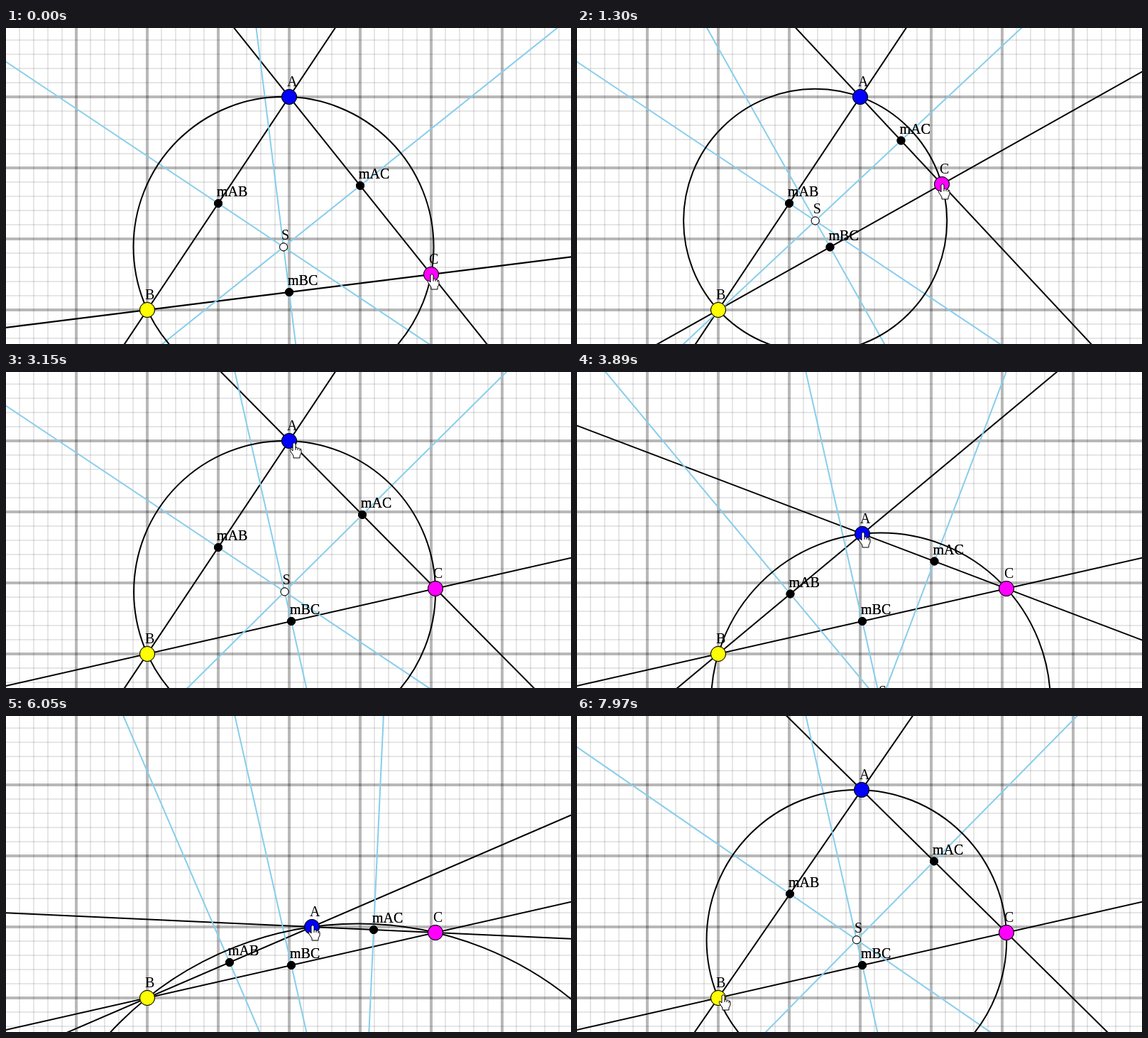
An HTML page with a canvas for the animation above (8000 ms loop, 796 by 445 pixels).

```html
<!DOCTYPE html>
<html lang="en">
<head>
<meta charset="utf-8">
<title>Circumscribed circle</title>
<style>
html, body { margin: 0; overflow: hidden; background: #fff; }
canvas { display: block; }
</style>
</head>
<body>
<canvas id="stage" width="796" height="445"></canvas>
<script>
const W = 796, H = 445, LOOP = 8000, SAMPLE = 75;
const ctx = document.getElementById('stage').getContext('2d');

// Dragged points: [time, x, y]
const B = [199, 397];
const pathC = [[0, 599, 347], [1300, 514, 220], [2560, 605, 305]];
const pathA = [
  [3390, 399, 97], [3890, 402, 228], [4860, 447, 377], [5240, 452, 396],
  [5660, 452, 396], [6050, 431, 297], [6490, 415, 193], [7310, 401, 104]
];

const handShape = new Path2D('M-2 2Q0-1 2 2V8Q4 6 5 8.5Q7 7 8 9.5Q10 8.5 10 11V15L8 19V22H-1V19L-5 13Q-7 9-4 10L-2 12Z');
const handFolds = new Path2D('M2 8V11M5 8.5V11M8 9.5V12');

const add = (p, x, y) => [p[0] + x, p[1] + y];
const lerp = (p, q, u) => p.map((v, i) => v + (q[i] - v) * u);
const mid = (p, q) => lerp(p, q, .5);

// Moves from p to q in the small jumps of a sampled pointer
function glide(t, t0, t1, p, q) {
  const n = Math.round((t1 - t0) / SAMPLE);
  const step = Math.floor((t - t0) / (t1 - t0) * n + .25);
  return lerp(p, q, Math.min(Math.max(step / n, 0), 1));
}

function follow(path, t) {
  let i = 1;
  while (i < path.length - 1 && t >= path[i][0]) i++;
  const [t0, ...p] = path[i - 1], [t1, ...q] = path[i];
  return glide(t, t0, t1, p, q);
}

function pointer(t, A, C) {
  const overA = add(A, 7, 2), heldA = add(A, 1, -3), heldC = add(C, 1, -1);
  if (t < 3390) return glide(t, 2560, 2930, heldC, overA);
  return glide(t, 7430, 7970, heldA, add(B, 7, -5));
}

function circumcenter(p, q, r) {
  const bx = q[0] - p[0], by = q[1] - p[1], cx = r[0] - p[0], cy = r[1] - p[1];
  const d = 2 * (bx * cy - by * cx) || 1e-4;
  const b2 = bx * bx + by * by, c2 = cx * cx + cy * cy;
  return add(p, (cy * b2 - by * c2) / d, (bx * c2 - cx * b2) / d);
}

function line([x, y], dx, dy, color) {
  const k = 1500 / Math.hypot(dx, dy);
  ctx.strokeStyle = color;
  ctx.lineWidth = 2;
  ctx.beginPath();
  ctx.moveTo(x - dx * k, y - dy * k);
  ctx.lineTo(x + dx * k, y + dy * k);
  ctx.stroke();
}

function ring([x, y], r, width) {
  ctx.beginPath();
  ctx.arc(x, y, r, 0, 2 * Math.PI);
  ctx.strokeStyle = '#000';
  ctx.lineWidth = width;
  ctx.stroke();
}

function dot(p, r, color) {
  ring(p, r, 1);
  ctx.fillStyle = color;
  ctx.fill();
  ctx.stroke();
}

function label(text, [x, y], dx, dy) {
  ctx.fillStyle = '#000';
  ctx.fillText(text, x + dx, y + dy);
}

function grid() {
  ctx.fillStyle = '#fff';
  ctx.fillRect(0, 0, W, H);
  const style = i => {
    const major = i % 5 === 0;
    ctx.fillStyle = `rgba(0,0,0,${major ? .28 : .2})`;
    return major ? 4 : 1;
  };
  for (let i = -4; i < 36; i++) {
    const w = style(i), x = 99 + 20 * i, y = 97 + 20 * i;
    ctx.fillRect(x - w / 2, 0, w, H);
    ctx.fillRect(0, y - w / 2, W, w);
  }
}

function hand([x, y]) {
  ctx.save();
  ctx.translate(Math.round(x), Math.round(y));
  ctx.fillStyle = '#fff';
  ctx.strokeStyle = '#000';
  ctx.lineWidth = 1;
  ctx.fill(handShape);
  ctx.stroke(handShape);
  ctx.stroke(handFolds);
  ctx.restore();
}

function draw(t) {
  const A = follow(pathA, t), C = follow(pathC, t), S = circumcenter(A, B, C);
  const sides = [['mAB', A, B], ['mAC', A, C], ['mBC', B, C]];

  grid();
  for (const [, p, q] of sides) line(p, q[0] - p[0], q[1] - p[1], '#000');
  for (const [, p, q] of sides) line(mid(p, q), p[1] - q[1], q[0] - p[0], 'skyblue');

  const radius = Math.hypot(S[0] - A[0], S[1] - A[1]);
  if (radius < 1e5) ring(S, radius, 2);

  ctx.font = '20px "Liberation Serif", "Times New Roman", serif';
  for (const [name, p, q] of sides) {
    const m = mid(p, q);
    dot(m, 5.5, '#000');
    // Doubled for a heavier weight
    label(name, m, -2, -10);
    label(name, m, -2, -10);
  }
  dot(S, 5.5, '#fff');
  label('S', S, -3, -10);
  for (const [name, p, color] of [['A', A, '#00f'], ['B', B, '#ff0'], ['C', C, '#f0f']]) {
    dot(p, 10.5, color);
    label(name, p, -3, -15);
  }
  hand(pointer(t, A, C));
}

const start = performance.now();
function tick() {
  draw((performance.now() - start) % LOOP);
  requestAnimationFrame(tick);
}
tick();
</script>
</body>
</html>
```
